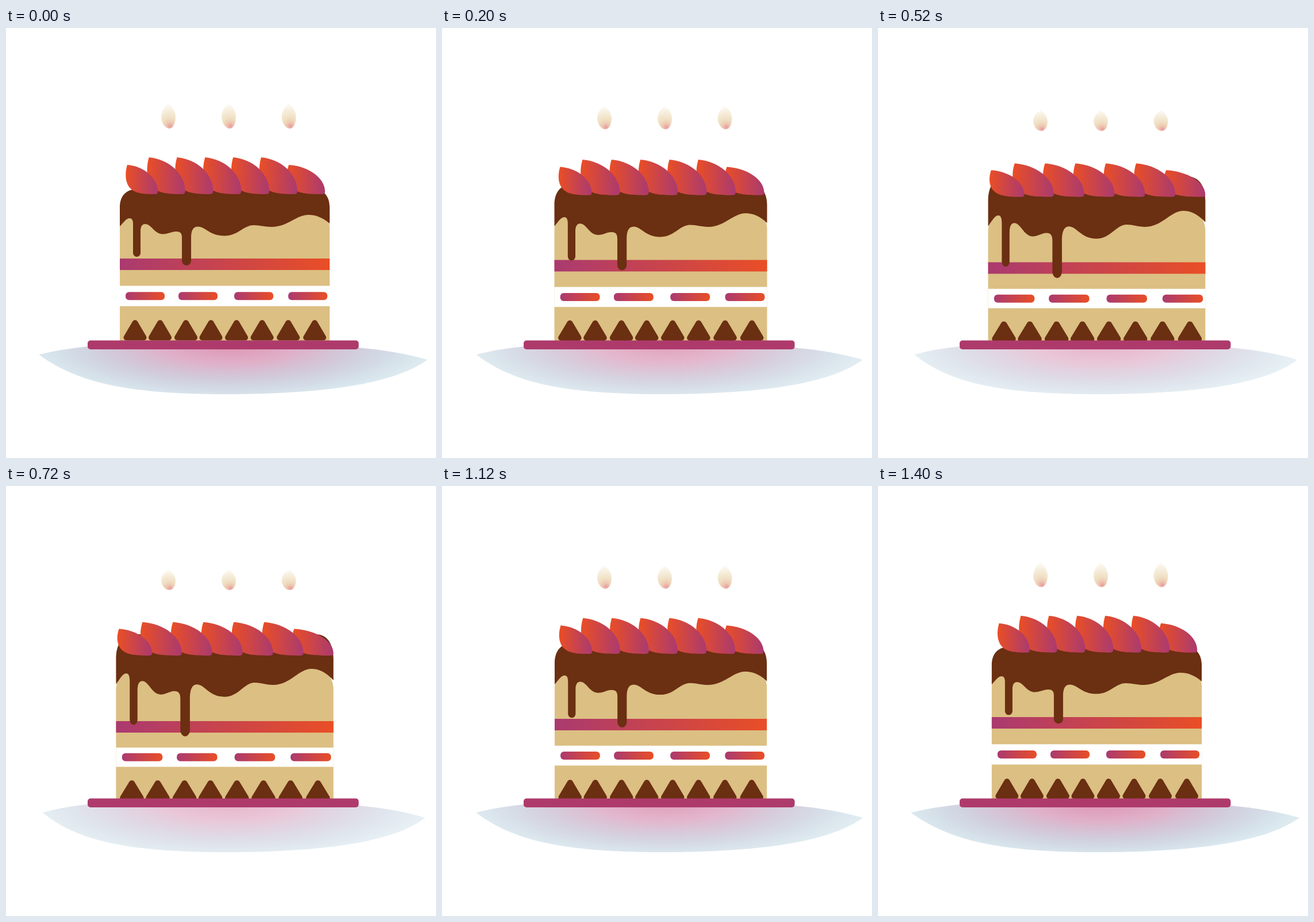
Write an HTML page with a canvas that moves like this. It is 748 by 748 pixels and loops after 1440 ms.

```html
<!DOCTYPE html>
<html lang="en">
<head>
<meta charset="utf-8">
<title>Birthday cake</title>
<style>
html, body { margin: 0; width: 100%; height: 100%; overflow: hidden; background: #fff; }
canvas { display: block; width: 748px; height: 748px; }
</style>
</head>
<body>
<canvas id="stage" width="748" height="748"></canvas>
<script>
const ctx = document.getElementById('stage').getContext('2d');
const LOOP = 1440, STEP = 40, MID = 380.5;
const ORANGE = '#e94e26', PURPLE = '#aa3a70', PLATE = '#ae3a6c';
const SPONGE = '#dcbf83', CHOCOLATE = '#6b2f12';

const TIMES = [0, 200, 520, 620, 720, 920, 1120, 1400, LOOP];
const STRETCH = [0, .354, .92, 1, .94, .583, .29, .02, 0];
const SINK = [0, .3, .8, .93, 1, .77, .5, .12, 0];
const SETTLE = [0, .12, .6, .85, 1, .88, .75, .25, 0];

function track(values, t) {
  let i = 1;
  while (i < TIMES.length - 1 && t > TIMES[i]) i++;
  const k = (t - TIMES[i - 1]) / (TIMES[i] - TIMES[i - 1]);
  return values[i - 1] + (values[i] - values[i - 1]) * k;
}

function sweep(x0, x1, from, to) {
  const g = ctx.createLinearGradient(x0, 0, x1, 0);
  g.addColorStop(0, from);
  g.addColorStop(1, to);
  return g;
}

function roundBox(x, y, w, h, radii, fill) {
  ctx.fillStyle = fill;
  ctx.beginPath();
  ctx.roundRect(x, y, w, h, radii);
  ctx.fill();
}

function scaled(cx, cy, sx, sy, draw) {
  ctx.save();
  ctx.translate(cx, cy);
  ctx.scale(sx, sy);
  ctx.translate(-cx, -cy);
  draw();
  ctx.restore();
}

function drawShadow(stretch) {
  const left = 57 + 7 * stretch, right = 733 - 4 * stretch;
  const path = new Path2D(
    `M${left} 568 Q100 558 142 554 L613 556 Q680 562 ${right} 577
     C690 608 600 637 380 637 C190 637 115 610 ${left} 568Z`);
  ctx.save();
  ctx.clip(path);
  ctx.globalAlpha = 1 - .32 * stretch;
  ctx.translate(388, 550);
  ctx.scale(1, .28);
  const g = ctx.createRadialGradient(0, 0, 0, 0, 0, 345);
  g.addColorStop(0, 'rgba(205,85,135,.64)');
  g.addColorStop(.35, 'rgba(190,90,140,.48)');
  g.addColorStop(.65, 'rgba(125,110,155,.35)');
  g.addColorStop(1, 'rgba(50,130,165,.17)');
  ctx.fillStyle = g;
  ctx.fillRect(-400, -50, 800, 500);
  ctx.restore();
}

function drawFlame(x, top, bottom) {
  ctx.save();
  ctx.translate(x, bottom);
  ctx.scale(1, (bottom - top) / 43);
  const g = ctx.createRadialGradient(3, -4, 0, 1, -6, 38);
  g.addColorStop(0, 'rgba(220,90,95,.62)');
  g.addColorStop(.16, 'rgba(222,145,105,.52)');
  g.addColorStop(.35, 'rgba(218,180,115,.44)');
  g.addColorStop(.7, 'rgba(222,190,125,.26)');
  g.addColorStop(1, 'rgba(225,195,135,.06)');
  ctx.fillStyle = g;
  ctx.fill(new Path2D('M0 -43 C7 -39 13 -29 12.5 -19 C12 -9 8 0 2 0 C-6 0 -12 -10 -12.5 -20 C-12.5 -30 -7 -39 0 -43Z'));
  ctx.restore();
}

function drawLayers(sink, settle) {
  roundBox(198, 303 + 6 * sink, 365, 243 - 6 * sink, [45, 45, 0, 0], SPONGE);
  roundBox(198, 401 + 8 * sink, 365, 20, 0, sweep(198, 563, PURPLE, ORANGE));
  roundBox(198, 448.5 + 6.5 * sink, 365, 35.5 - 2 * sink, 0, '#fff');
  for (const x of [208, 300, 397, 491]) {
    roundBox(x, 459.3 + 5.5 * sink, 68, 14, 6, sweep(x, x + 68, PURPLE, ORANGE));
  }
  ctx.fillStyle = ctx.strokeStyle = CHOCOLATE;
  ctx.lineJoin = 'round';
  ctx.lineWidth = 10;
  const drop = 4 * settle;
  for (const x of [224.5, 268, 313, 356.5, 401, 445.5, 491, 537]) {
    ctx.beginPath();
    ctx.moveTo(x, 513 + drop);
    ctx.lineTo(x + 15, 538.5 + drop);
    ctx.lineTo(x - 15, 538.5 + drop);
    ctx.closePath();
    ctx.fill();
    ctx.stroke();
  }
}

const ICING = new Path2D(
  `M198 345 V312 C198 294 207 280 230 280 H534 C552 280 563 292 563 312 V340
   C550 329 538 325 526 325 C505 325 490 346 462 346 C450 346 441 343 431 343
   C413 343 404 361.5 380 361.5 C354 361.5 347 345.5 334 345.5 C325 345.5 322 353 322 365
   V405 A8 8 0 0 1 306 405 V364 C306 357 303 354 296 354 C288 354 282 358.5 273 358.5
   C258 358.5 253 341 242 341 C237 341 234 345 234 353
   V391.5 A6.5 6.5 0 0 1 221 391.5 V341 C221 334 219 331 215 331 C209 331 204 339 198 345Z`);

const SLICE = new Path2D(
  'M0 0 C34 3 63 28 63 59 Q63 64 57 64 C32 64 16 62 7 52 C-5 40 -5 17 0 0Z');

function drawSlice(x, y, sx) {
  ctx.save();
  ctx.translate(x, y);
  ctx.scale(sx, (289 - y) / 64);
  ctx.fillStyle = sweep(-2, 63, ORANGE, PURPLE);
  ctx.fill(SLICE);
  ctx.restore();
}

function drawFruit() {
  drawSlice(492, 238, 1);
  for (let i = 4; i >= 0; i--) drawSlice(248.7 + 48.8 * i, 225, 1);
  drawSlice(211, 238, .845);
}

function draw(t) {
  const stretch = track(STRETCH, t), sink = track(SINK, t), settle = track(SETTLE, t);
  const wide = 1 + .0384 * stretch;
  ctx.clearRect(0, 0, 748, 748);
  drawShadow(stretch);
  for (const x of [282.5, 387.5, 492]) {
    drawFlame(x, 132 + 14 * sink, 175 + 3 * (sink + settle));
  }
  scaled(MID, 544, wide, 1, () => drawLayers(sink, settle));
  scaled(MID, 346, wide, 1 + .356 * stretch, () => {
    ctx.fillStyle = CHOCOLATE;
    ctx.fill(ICING);
  });
  ctx.save();
  ctx.translate(0, 6 * sink);
  scaled(381.5, 289, 1 + .09 * stretch, 1 - .095 * stretch, drawFruit);
  ctx.restore();
  roundBox(142, 543.5, 471.5, 15.5, 5, PLATE);
}

const start = performance.now();
function tick(now) {
  const t = Math.max(0, now - start) % LOOP;
  draw(Math.floor(t / STEP) * STEP);
  requestAnimationFrame(tick);
}
draw(0);
requestAnimationFrame(tick);
</script>
</body>
</html>
```
